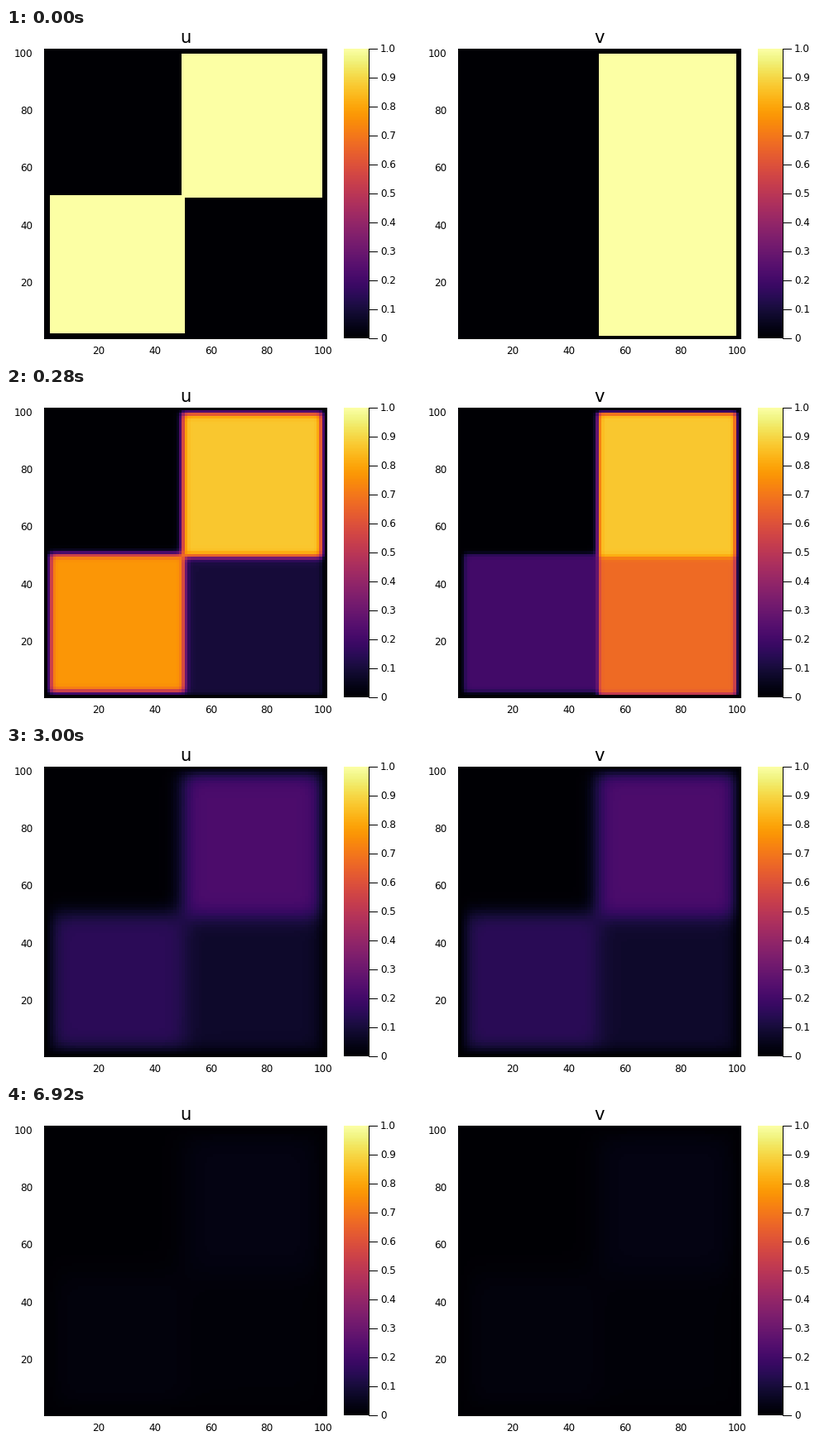
A matplotlib script for the animation above (8000 ms loop, 1000 by 400 pixels).

```python
import matplotlib.pyplot as plt
import numpy as np
from matplotlib.animation import FuncAnimation

W, H, DPI = 1000, 400, 100
FRAMES, STEP_MS, SUBSTEPS = 400, 20, 4
N = 101                                # grid cells per side
TOP, BOTTOM, WIDTH = 25, 375, 342      # heatmap box in pixels
PANELS = (("u", 46), ("v", 546))
DIFF_U, DIFF_V = 2.0, 1.0              # cells^2 per second

plt.rcParams["font.family"] = "DejaVu Sans"
LUT = (plt.get_cmap("inferno")(np.arange(256))[:, :3] * 255).round().astype(np.uint8)

# nearest grid cell of each heatmap pixel
ROWS = N - 1 - (np.arange(TOP, BOTTOM) - 24) * N // 351
COLS = np.arange(WIDTH) * N // WIDTH


def laplacian(a):
    """Five-point stencil with the rim held at zero."""
    out = np.zeros_like(a)
    out[1:-1, 1:-1] = (a[2:, 1:-1] + a[:-2, 1:-1] + a[1:-1, 2:]
                       + a[1:-1, :-2] - 4 * a[1:-1, 1:-1])
    return out


def solve():
    """Linear reaction-diffusion of two coupled fields, as colour levels."""
    u, v = np.zeros((N, N)), np.zeros((N, N))
    u[2:50, 2:50] = 1
    u[49:99, 49:99] = 1
    v[1:99, 50:99] = 1
    dt = STEP_MS / 1000 / SUBSTEPS
    states = []
    for _ in range(FRAMES):
        states.append([(np.clip(f, 0, 1) * 255).round().astype(int) for f in (u, v)])
        for _ in range(SUBSTEPS):
            du = DIFF_U * laplacian(u) - u + 0.5 * v
            dv = DIFF_V * laplacian(v) + u - 1.5 * v
            u, v = u + dt * du, v + dt * dv
    return states


def label(x, y, text, px=12, ha="center"):
    fig.text(x / W, 1 - y / H, text, fontsize=px * 72 / DPI, ha=ha, va="baseline")


def draw_backdrop():
    """Titles, tick labels and colour bars, rendered once to an array."""
    page = np.full((H, W, 3), 255, np.uint8)
    levels = np.linspace(255, 0, BOTTOM - TOP).round().astype(int)
    for title, x0 in PANELS:
        page[TOP:BOTTOM + 1, x0:x0 + WIDTH] = 0
        page[TOP:BOTTOM, x0 + 362:x0 + 392] = LUT[levels][:, None]
        page[TOP:BOTTOM + 1, x0 + 392] = 0
        label(x0 + WIDTH / 2, 18, title, px=21)
        for k in range(11):
            y = BOTTOM - 35 * k
            page[y, x0 + 392:x0 + 403] = 0
            label(x0 + 406, y + 4, f"{k / 10:.1f}" if k else "0", ha="left")
        for n in range(20, N, 20):
            label(x0 + (n - 0.5) * WIDTH / N, 394.4, str(n))
            label(x0 - 13.5, BOTTOM - (n - 0.5) * 350 / N + 4.4, str(n), ha="right")
    fig.figimage(page, origin="upper", zorder=-1)
    fig.canvas.draw()
    pixels = np.array(fig.canvas.buffer_rgba())[..., :3]
    fig.clear()
    return pixels


def update(i):
    page = backdrop.copy()
    for (_, x0), field in zip(PANELS, states[i]):
        page[TOP:BOTTOM, x0:x0 + WIDTH] = LUT[field[ROWS][:, COLS]]
    image.set_data(page)
    return (image,)


fig = plt.figure(figsize=(W / DPI, H / DPI), dpi=DPI, facecolor="white")
states = solve()
backdrop = draw_backdrop()
image = fig.figimage(backdrop, origin="upper")
anim = FuncAnimation(fig, update, frames=FRAMES, interval=STEP_MS,
                     repeat=True, repeat_delay=0)
plt.show()
```
